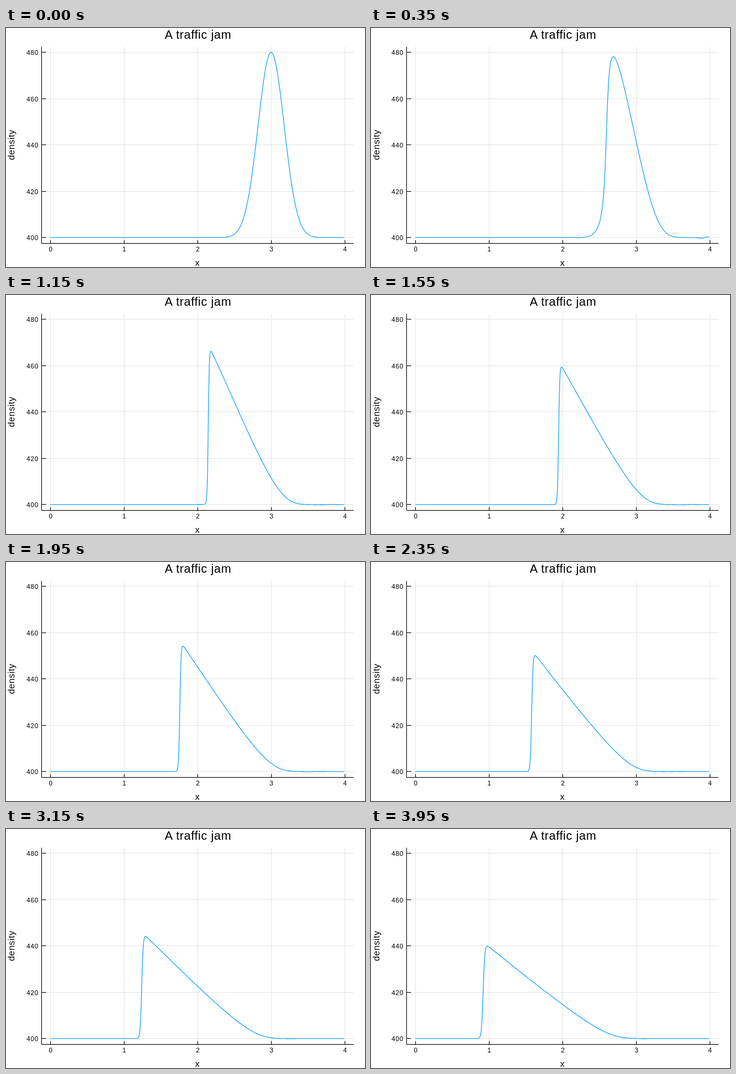
An HTML page for the animation above (4000 ms loop, 600x400 px).

```html
<!DOCTYPE html>
<html>
<head>
<meta charset="utf-8">
<style>
html, body { margin: 0; width: 100%; height: 100%; overflow: hidden; background: #fff; }
svg { display: block; }
text { font: 11px "Liberation Sans", Arial, sans-serif; letter-spacing: .7px; }
.label { font-size: 15px; letter-spacing: .5px; }
.title { font-size: 20px; letter-spacing: .55px; }
.mid { text-anchor: middle; }
.end { text-anchor: end; }
path { fill: none; stroke: #000; }
#grid { stroke: #e5e5e5; }
#curve { stroke: #009afa; stroke-width: 1.1; stroke-linejoin: round; }
</style>
</head>
<body>
<svg width="600" height="400" viewBox="0 0 600 400">
  <clipPath id="area"><rect x="59" y="31" width="522" height="329"/></clipPath>
  <path id="grid"/>
  <path id="axes"/>
  <path id="curve" clip-path="url(#area)"/>
  <g id="ticks"></g>
  <text class="title mid" x="321" y="18">A traffic jam</text>
  <text class="label mid" x="320" y="398">x</text>
  <text class="label mid" transform="translate(14 195.5) rotate(-90)">density</text>
</svg>
<script>
const $ = id => document.getElementById(id);
const px = x => 74.1 + 123 * x;
const py = rho => 350.8 - 3.875 * (rho - 400);
const snap = v => Math.floor(v) + 0.5;

// Axes, grid and tick labels
let grid = "", axes = "M59.5 31.5V360.5H581", labels = "";
for (let i = 0; i <= 4; i++) {
  const x = snap(px(i)), rho = 400 + 20 * i, y = snap(py(rho));
  grid += `M${x} 31.5V360M59.5 ${y}H581`;
  axes += `M${x} 360V355M59.5 ${y}H67`;
  labels += `<text class="mid" x="${x + 0.3}" y="374">${i}</text>` +
            `<text class="end" x="54.7" y="${y + 4}">${rho}</text>`;
}
$("grid").setAttribute("d", grid);
$("axes").setAttribute("d", axes);
$("ticks").innerHTML = labels;

// Viscous Burgers equation for the excess density, solved by Cole-Hopf
const DRIFT = 0.207, GAIN = 0.0089, NU = 0.0021;
const START = -0.7, STEP = 0.005, COUNT = 1260;
const bump = x => 80 * Math.exp(-16 * (x - 3) ** 2);
const potential = new Float64Array(COUNT);
for (let j = 1; j < COUNT; j++)
  potential[j] = potential[j - 1] - GAIN * STEP * bump(START + (j - 0.5) * STEP);

const action = new Float64Array(COUNT);
function jam(x, t) {
  if (!t) return bump(x);
  const z = x + DRIFT * t;
  let least = Infinity, sum = 0, moment = 0;
  for (let j = 0; j < COUNT; j++) {
    const d = z - START - j * STEP;
    action[j] = (potential[j] + d * d / (2 * t)) / (2 * NU);
    if (action[j] < least) least = action[j];
  }
  for (let j = 0; j < COUNT; j++) {
    const e = action[j] - least;
    if (e > 40) continue;
    const w = Math.exp(-e);
    sum += w;
    moment += w * (START + j * STEP - z);
  }
  return moment / (sum * t * GAIN);
}

// Small ripple that spreads from the periodic boundary
function ripple(x, t) {
  if (!t) return 0;
  const z = x + DRIFT * t - (x > 2 ? 4 : 0);
  const s = z / Math.sqrt(2 * NU * t);
  return 0.1 / t * s * Math.exp((1 - s * s) / 2);
}

let shown = -1;
function draw(now) {
  const step = Math.floor(now % 4000 / 50);
  if (step !== shown) {
    shown = step;
    const t = step * 0.05, points = [];
    for (let i = 0; i < 500; i++) {
      const x = i * 0.008;
      points.push(px(x).toFixed(2) + " " + py(400 + jam(x, t) + ripple(x, t)).toFixed(2));
    }
    $("curve").setAttribute("d", "M" + points.join("L"));
  }
  requestAnimationFrame(draw);
}
draw(performance.now());
</script>
</body>
</html>
```
